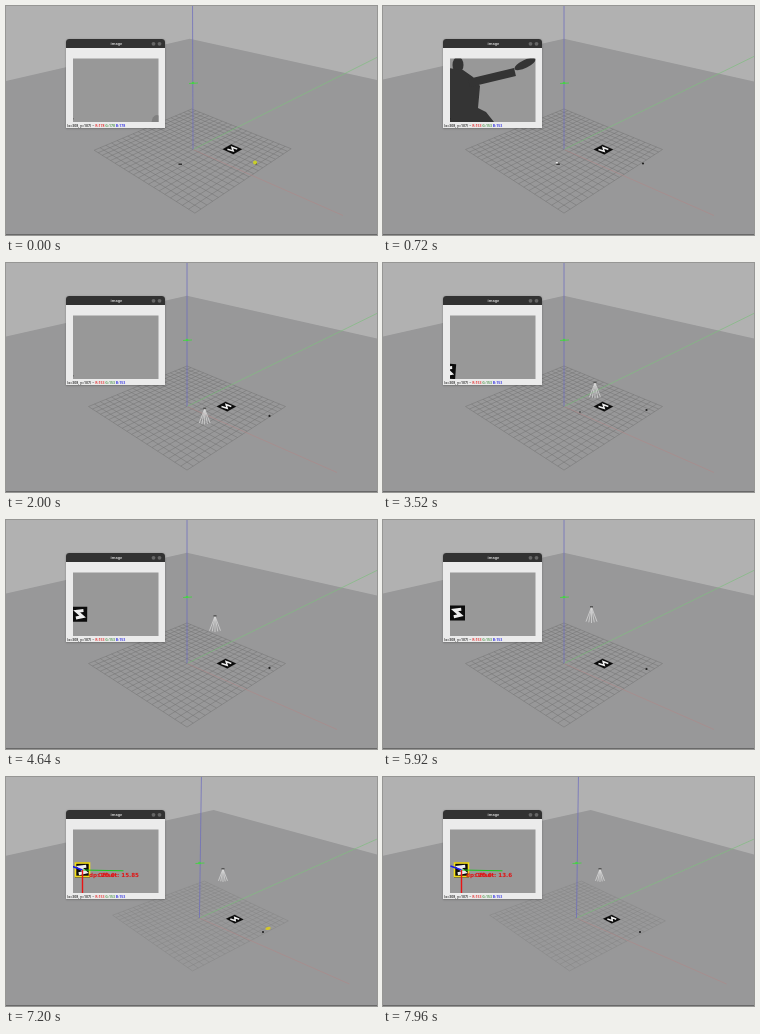
Write an HTML page with a canvas that moves like this. It is 371 by 229 pixels and loops after 8000 ms.

```html
<!DOCTYPE html>
<html lang="en">
<head>
<meta charset="utf-8">
<title>Drone simulation</title>
<style>
  html, body { margin: 0; width: 100%; height: 100%; overflow: hidden; background: #999; }
  canvas { display: block; width: 100vw; height: 100vh; }
</style>
</head>
<body>
<canvas id="stage" width="371" height="229"></canvas>
<script>
const ctx = document.getElementById('stage').getContext('2d');
const LOOP = 8000;
const INK = '#0b0b0b';

// Camera: screen origin, width and height of the half grid, perspective, yaw,
// height of the ring above the origin, brightness of the grid lines.
const MAIN = { x: 181, y: 143.5, w: 98.5, h: 49.5, depth: 0.222, yaw: 0, ring: 66.5, grid: 114 };
const START = { ...MAIN, x: 187, yaw: -0.015 };
const END = { x: 193.5, y: 141, w: 88, h: 43.6, depth: 0.178, yaw: 0.065, ring: 55, grid: 132 };

const clamp = x => Math.min(1, Math.max(0, x));
const mix = (a, b, k) => a + (b - a) * k;
const gray = v => `rgb(${v},${v},${v})`;
const ease = (t, from, to) => {
  const k = clamp((t - from) / (to - from));
  return k * k * (3 - 2 * k);
};
const panAt = t => ease(t, 5960, 7240);

function viewAt(t) {
  const [from, to, k] = t < 3000 ? [START, MAIN, ease(t, 40, 560)] : [MAIN, END, panAt(t)];
  return Object.fromEntries(Object.keys(MAIN).map(key => [key, mix(from[key], to[key], k)]));
}

// Screen position of a ground point: x to the right, y away from the camera.
function project(view, x, y) {
  const sin = Math.sin(view.yaw), cos = Math.cos(view.yaw);
  const side = x * cos + y * sin, away = y * cos - x * sin;
  const scale = 1 / (1 + view.depth * away);
  return [view.x + view.w * side * scale, view.y - view.h * away * scale];
}

function path(points) {
  ctx.beginPath();
  points.forEach(p => ctx.lineTo(...p));
}
function line(points, color, width = 1) {
  path(points);
  ctx.strokeStyle = color;
  ctx.lineWidth = width;
  ctx.stroke();
}
function fill(points, color) {
  path(points);
  ctx.fillStyle = color;
  ctx.fill();
}
function rect(x, y, w, h, color) {
  ctx.fillStyle = color;
  ctx.fillRect(x, y, w, h);
}
function oval(x, y, rx, ry, angle, color) {
  ctx.beginPath();
  ctx.ellipse(x, y, rx, ry, angle, 0, 7);
  ctx.fillStyle = color;
  ctx.fill();
}
const dot = (x, y, r, color) => oval(x, y, r, r, 0, color);
function panel(y, height, color) {
  ctx.beginPath();
  ctx.roundRect(60, y, 99, height, [3, 3, 0, 0]);
  ctx.fillStyle = color;
  ctx.fill();
}
function text(str, x, y, font, color) {
  ctx.font = font;
  ctx.fillStyle = color;
  ctx.fillText(str, x, y);
  return x + ctx.measureText(str).width;
}

// Dark tile with a plain white squiggle.
function tile(map, strokeWidth) {
  fill([[0, 0], [1, 0], [1, 1], [0, 1]].map(p => map(...p)), INK);
  line([[.75, .25], [.3, .3], [.7, .65], [.25, .75]].map(p => map(...p)), '#eee', strokeWidth);
}

function drawWorld(t) {
  const view = viewAt(t);
  const at = (x, y) => project(view, x, y);
  const ground = (u, v) => at(u - v, 1 - u - v);

  rect(0, 0, 371, 229, '#b1b1b1');
  fill([at(-5, 0), at(0, 4.44), at(5, 0), [371, 229], [0, 229]], '#989899');
  for (let i = 0; i <= 20; i++) {
    const k = i / 20;
    line([ground(k, 0), ground(k, 1)], gray(view.grid), 0.5);
    line([ground(0, k), ground(1, k)], gray(view.grid), 0.5);
  }

  const { x, y } = view;
  const ray = (length, slope) => [[x, y], [x + length, y + length * slope]];
  line(ray(200, 0.7 * view.yaw - 0.49), '#80bd80', 0.7);
  line(ray(150, 0.44), '#b38484', 0.5);
  line([[x, y], [x + 30 * view.yaw, 0]], '#6c6cbe', 0.75);
  line([[x - 4, y - view.ring + 0.5], [x + 5, y - view.ring]], '#4fcb4f', 1.1);
  dot(x, y - view.ring, 1.3, '#45d345');

  tile((u, v) => ground(0.65 + u * 0.1, 0.25 + v * 0.1), 1.5);
  drawPointer(t);
  drawDrone(t);
  rect(0, 228, 371, 1, '#696969');
}

function drawPointer(t) {
  const x = 250 + 10 * ease(t, 0, 720) + 3.5 * ease(t, 720, 2000) - 6.5 * panAt(t);
  const y = 157.5 - 10.5 * ease(t, 720, 3520) + 2 * ease(t, 3520, 5920) + 6 * panAt(t);
  dot(x, y, 1.1, '#222');
  if (t < 520) dot(x - 1, y - 1, 2, '#c9cf28');
  if (t > 5960 && t < 7400) oval(x + 5, y - 3.5, 2.7, 1.5, -0.2, '#d4c72a');
}

function drawDrone(t) {
  const pan = panAt(t);
  const x = 174 + 38 * ease(t, 500, 3000) - 3.5 * ease(t, 3500, 5000) + 8.5 * pan;
  const y = 158 - 72 * clamp((t - 700) / 4340) ** 1.4 + 5 * pan;
  const size = ease(t, 900, 2000) - 0.18 * pan;
  if (t > 2600 && t < 4200) dot(197, 149, 1, '#555');
  if (size < 0.3) {
    rect(x - 1.5, y - 0.5, 3.5, 1.5, '#333');
    if (t > 400) rect(x - 2, y - 2, 2, 1.5, '#eee');
    return;
  }
  for (let dx = -5.5; dx <= 5.5; dx += 2.75) {
    const foot = 17 - Math.abs(dx) * 0.25;
    line([[x, y + 1], [x + dx * size, y + foot * size]], '#dadada', 0.75);
  }
  rect(x - 1.5, y, 3, 1.5, '#555');
}

function drawWindow(t) {
  ctx.save();
  ctx.shadowColor = '#0005';
  ctx.shadowBlur = 2;
  ctx.shadowOffsetY = 0.5;
  panel(33, 89, '#ebebeb');
  ctx.restore();
  panel(33, 9, '#323232');
  text('image', 104.5, 39, 'bold 3.8px "Noto Sans", sans-serif', '#ccc');
  dot(147.5, 37.8, 1.9, '#666');
  dot(153.5, 37.8, 1.9, '#666');

  ctx.save();
  ctx.beginPath();
  ctx.rect(67, 52.5, 85.5, 63.5);
  ctx.clip();
  rect(67, 52, 86, 65, '#989898');
  drawArm(t);
  drawMarker(t);
  ctx.restore();

  const font = 'bold 3.5px "Noto Sans", sans-serif';
  const level = t < 40 ? 178 : 153;
  let x = text('(x=308, y=107) ~ ', 61, 120.8, font, '#444');
  x = text(`R:${level} `, x, 120.8, font, '#e24040');
  x = text(`G:${level} `, x, 120.8, font, '#5a9a5a');
  text(`B:${level}`, x, 120.8, font, '#4040e2');
}

// Robot silhouette that slides through the camera picture.
function drawArm(t) {
  const enter = ease(t, 0, 500), leave = ease(t, 900, 1500);
  const color = gray(mix(128, 52, enter));
  ctx.save();
  ctx.translate(76 * (1 - enter) - 95 * leave, 58 * (1 - enter) + 24 * leave);
  oval(75, 59, 5.5, 8, 0, color);
  fill([[66, 62], [80, 64], [90, 71], [97, 80], [95, 102], [103, 106], [111, 116],
    [66, 130]], color);
  line([[86, 77], [132, 66]], color, 8);
  oval(142, 58, 11.5, 4, -0.45, color);
  ctx.restore();
}

function drawMarker(t) {
  const arrive = ease(t, 2400, 5000), drift = ease(t, 6400, 8000);
  const x = mix(59, 74.5, arrive) + 4 * drift;
  const y = mix(118, 93, arrive);
  const angle = 0.12 * (1 - arrive);
  const size = 15;
  tile((u, v) => {
    const dx = (u - 0.5) * size, dy = (v - 0.5) * size;
    return [x + dx * Math.cos(angle) - dy * Math.sin(angle),
            y + dx * Math.sin(angle) + dy * Math.cos(angle)];
  }, 3);
  if (t > 6300) drawDetection(t, x, y);
}

function drawDetection(t, x, y) {
  ctx.strokeStyle = '#f5df18';
  ctx.lineWidth = 1.6;
  ctx.strokeRect(x - 7, y - 7, 14, 13.5);
  line([[x - 11, y - 4], [x, y]], '#1717e8', 1.6);
  line([[x, y], [x + 41, y + 0.8]], '#18c818', 1);
  line([[x, y], [x, 116]], '#e81515', 1.4);
  const k = (t - 7200) / 760;
  const offset = +mix(15.85, 13.6, k).toFixed(2);
  const font = 'bold 5.6px "DejaVu Sans", sans-serif';
  text('dp: 20.0', 83, 99.8, font, '#e01414');
  text(`Offset: ${offset}`, 92, 99.8, font, '#e01414');
}

function frame() {
  const t = performance.now() % LOOP;
  drawWorld(t);
  drawWindow(t);
  requestAnimationFrame(frame);
}
frame();
</script>
</body>
</html>
```
